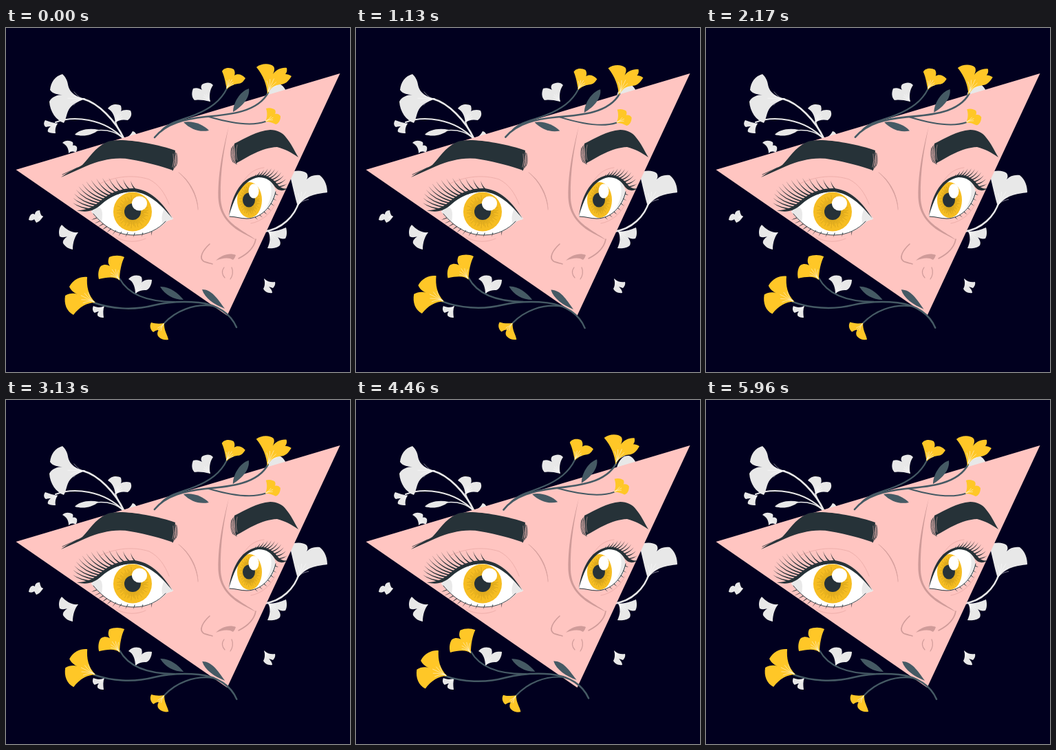
An HTML page with a canvas that plays this animation: 500x500 px, repeating every 6 s.

```html
<!DOCTYPE html>
<html lang="en">
<head>
<meta charset="utf-8">
<title>Eyes and ginkgo</title>
<style>
html, body { margin: 0; width: 100%; height: 100%; overflow: hidden; background: #01001f; }
canvas { display: block; width: 500px; height: 500px; }
</style>
</head>
<body>
<canvas id="stage"></canvas>
<script>
const SIZE = 500, LOOP = 6000;
const NAVY = '#01001f', SKIN = '#ffc5c1', INK = '#263238', STEM = '#455a64',
      YELLOW = '#ffc727', GREY = '#e8e8e8', LINE = '#cf9b99', FAINT = '#eeafab';

const canvas = document.getElementById('stage');
const ratio = window.devicePixelRatio || 1;
canvas.width = canvas.height = SIZE * ratio;
let ctx;

function fill(d, color) {
  ctx.fillStyle = color;
  ctx.fill(new Path2D(d));
}
function stroke(d, color, width) {
  ctx.strokeStyle = color;
  ctx.lineWidth = width;
  ctx.stroke(new Path2D(d));
}
function oval(x, y, rx, ry, color) {
  ctx.fillStyle = color;
  ctx.beginPath();
  ctx.ellipse(x, y, rx, ry, 0, 0, Math.PI * 2);
  ctx.fill();
}
// Fine white veins fanning out from the foot of a petal pair
function veins(x, y, angle, length) {
  const a0 = angle * Math.PI / 180, side = length > 12 ? 2 : 1;
  for (let i = -side; i <= side; i++) {
    const a = a0 + i * 0.28, r = length * (1 - Math.abs(i) * 0.12);
    stroke(`M${x} ${y}Q${x + Math.cos(a0) * r * 0.4} ${y + Math.sin(a0) * r * 0.4} ${x + Math.cos(a) * r} ${y + Math.sin(a) * r}`, '#fff', 0.5);
  }
}
function bloom(d, color, x, y, angle, length) {
  fill(d, color);
  veins(x, y, angle, length);
}
function cubic(p, t) {
  const u = 1 - t, w = [u * u * u, 3 * u * u * t, 3 * u * t * t, t * t * t];
  return [0, 1].map(k => w.reduce((sum, v, i) => sum + v * p[i][k], 0));
}
// Tapered lashes between a root curve and a tip curve
function lashes(roots, tips, count, width, bend) {
  ctx.fillStyle = INK;
  for (let i = 0; i < count; i++) {
    const t = i / (count - 1);
    const [x, y] = cubic(roots, t), [tx, ty] = cubic(tips, t);
    const cx = x + (tx - x) * 0.65, cy = y + (ty - y) * bend;
    const len = Math.hypot(tx - x, ty - y) || 1;
    const nx = -(ty - y) / len * width / 2, ny = (tx - x) / len * width / 2;
    ctx.beginPath();
    ctx.moveTo(x + nx, y + ny);
    ctx.quadraticCurveTo(cx + nx * 0.6, cy + ny * 0.6, tx, ty);
    ctx.quadraticCurveTo(cx - nx * 0.6, cy - ny * 0.6, x - nx, y - ny);
    ctx.fill();
  }
}
function iris(x, y, rx, ry) {
  oval(x, y, rx, ry, '#f6bd22');
  ctx.strokeStyle = 'rgba(150,112,20,0.55)';
  ctx.lineWidth = 0.5;
  ctx.beginPath();
  for (let i = 0; i < 72; i++) {
    const a = i * Math.PI / 36, r = 0.72 + 0.12 * Math.sin(i * 2.4);
    ctx.moveTo(x + Math.cos(a) * rx * 0.38, y + Math.sin(a) * ry * 0.38);
    ctx.lineTo(x + Math.cos(a) * rx * r, y + Math.sin(a) * ry * r);
  }
  ctx.stroke();
}

function greyFlowers() {
  stroke('M112 103C134 109 159 134 172 162', GREY, 2.6);
  stroke('M72 137C98 127 142 131 171 161', GREY, 2);
  stroke('M130 149C150 147 162 152 172 162', GREY, 1.6);
  stroke('M159 136C162 145 166 151 171 160', GREY, 1.8);
  fill('M100 155C106 148 120 145 135 148C124 157 111 158 100 155Z', GREY);
  fill('M170 160C174 160 180 158 184 150C188 151 190 154 190 158Z', GREY);
  bloom('M116 103C104 101 92 95 90 82C89 76 87 72 82 67C71 70 65 79 64 90C68 96 76 97 82 97C75 97 66 100 63 107C64 122 73 134 84 138C88 132 88 122 93 116C99 109 108 105 116 103Z', GREY, 114, 103, 182, 24);
  bloom('M159 138C158 128 155 121 148 117C153 110 162 110 167 113C168 117 168 119 167 121C170 119 176 118 181 120C184 126 181 131 177 134C171 133 164 133 159 138Z', GREY, 160, 136, -58, 13);
  bloom('M75 139C69 138 63 136 57 134C54 138 55 142 58 144C61 143 63 143 65 143C62 145 60 148 61 151C65 153 69 153 72 153C71 148 72 143 75 139Z', GREY, 74, 139, 150, 8);
  bloom('M91 182C91 175 88 170 82 167C86 163 92 163 97 166C98 168 97 170 97 171C99 170 102 171 103 173C104 177 102 180 101 181C97 179 94 179 91 182Z', GREY, 92, 181, -55, 8);
  bloom('M297 107C286 104 278 104 274 105C269 100 270 93 272 88C277 86 282 88 285 90C283 87 283 85 285 82C290 79 297 78 301 83C296 90 295 99 297 107Z', GREY, 296, 106, 230, 12);
  fill('M378 104C380 88 388 80 397 81C403 83 406 89 408 94Z', GREY);
  stroke('M426 252C420 273 401 293 374 296', GREY, 2.6);
  bloom('M424 259C421 250 417 232 412 211C420 206 432 207 437 211C439 214 439 217 437 220C442 215 448 213 456 214C464 220 467 230 467 239C452 241 435 243 424 259Z', GREY, 425, 257, -60, 22);
  bloom('M381 296C390 296 400 293 407 290C409 297 408 303 406 306C402 307 398 306 395 304C398 308 400 312 398 316C394 320 386 321 380 320C384 312 385 303 381 296Z', GREY, 382, 296, 45, 13);
  bloom('M375 364C380 369 386 370 391 369C392 373 390 376 388 378C386 377 384 377 382 376C384 378 387 381 387 385C381 386 376 383 374 379C376 376 377 370 375 364Z', GREY, 376, 366, 52, 8);
  bloom('M54 274C50 280 47 282 44 283C43 281 42 280 41 278C39 280 36 280 33 279C34 273 37 268 42 271C42 268 44 265 49 265C50 270 51 273 54 274Z', GREY, 53, 274, 165, 6);
  bloom('M105 297C95 298 88 293 81 286C77 290 76 297 78 303C82 305 86 304 89 303C85 306 82 309 83 313C87 319 92 321 97 322C97 312 100 303 105 297Z', GREY, 103, 298, 155, 12);
  bloom('M188 387C188 377 185 368 178 365C183 359 192 358 197 362C198 365 198 368 197 370C200 366 207 365 212 366C212 373 208 380 204 381C197 381 191 382 188 387Z', GREY, 189, 385, -58, 13);
  bloom('M143 404C137 407 131 406 127 404C125 408 126 412 129 414C131 413 133 412 135 412C133 414 132 417 134 419C137 421 140 421 142 421C141 414 141 409 143 404Z', GREY, 142, 405, 135, 8);
}

function faceLines() {
  stroke('M137 226C160 215 186 213 208 220C222 227 231 240 237 256', FAINT, 1);
  stroke('M160 304C174 312 190 312 203 306', FAINT, 1);
  fill('M251 210C268 222 279 243 279.5 265C277 243 266 223 251 210Z', LINE);
  stroke('M251 210C267 222 278 243 279 264', '#dda5a2', 0.8);
  fill('M324 142C317 171 308 205 308.5 247C310 270 321 283 337 294C347 300 356 304 363 308C356 302 347 298 338 291C323 281 313 269 312 247C311 205 318 171 324 142Z', LINE);
  stroke('M363 307C361 318 354 327 338 335', LINE, 1.6);
  stroke('M296 314C286 323 280 334 287 339C291 341 297 342 300 343', LINE, 1.6);
  fill('M305 338C313 330 325 326 334 330C333 333 332 335 330 337C324 333 315 334 305 338Z', LINE);
  stroke('M317 348C313 353 314 359 318 363', LINE, 1.2);
  stroke('M328 348C331 354 329 361 326 365', LINE, 1.2);
  stroke('M339 236C345 220 355 205 375 203', FAINT, 1);
  stroke('M356 284C373 281 386 268 391 256', FAINT, 1);
}

function brows() {
  fill('M80 217C90 209 103 204 111 199C121 189 129 174 146 166C157 161 180 163 203 167C220 170 235 174 246 178L243 207C226 201 204 195 181 191C160 187 137 192 116 201Z', INK);
  fill('M332 168C348 160 364 150 384 148C394 148 402 152 407 159C414 167 419 178 425 188C415 181 406 176 394 173C371 174 352 187 334 197Z', INK);
  for (let i = 0; i < 4; i++) {
    const x = 243 + i * 1.6;
    stroke(`M${x} ${179 + i}Q${x + 3} ${192 + i} ${x - 1} ${207 - i * 2}`, INK, 0.8);
    const r = 333 - i * 1.7;
    stroke(`M${r} ${168 + i * 2}Q${r - 3} ${183 + i} ${r + 2} ${198 - i}`, INK, 0.8);
  }
  stroke('M243 183Q245 193 242 202', SKIN, 0.5);
  stroke('M336 170Q333 182 336 192', SKIN, 0.5);
  stroke('M82 213L104 203', INK, 0.8);
}

function leftEye() {
  const white = 'M124 267C142 247 160 236 185 235C209 236 225 254 243 277C239 280 235 279 232 282C222 293 206 301 186 301C160 301 142 288 124 267Z';
  fill(white, '#fff');
  ctx.save();
  ctx.clip(new Path2D(white));
  fill('M120 266C139 254 143 262 138 288L120 280Z', '#e9e9e9');
  fill('M230 263C225 273 226 280 229 288L247 281Z', '#e9e9e9');
  iris(184, 267, 28, 28.5);
  oval(184, 267, 12, 12, INK);
  oval(194, 255, 11, 10.5, '#fff');
  ctx.restore();
  fill('M103 265C120 265 130 258 140 249C152 239 168 233 185 233C210 235 227 253 242 277C225 256 208 240 186 238C167 237 150 246 139 256C128 266 117 269 103 265Z', INK);
  stroke('M127 270C142 288 160 301 186 301C206 301 222 292 232 281', INK, 0.9);
  lashes([[126, 264], [140, 250], [158, 239], [190, 236]],
         [[97, 254], [95, 221], [132, 211], [181, 222]], 14, 2.2, 0.25);
  lashes([[132, 276], [146, 292], [166, 302], [212, 296]],
         [[124, 279], [137, 298], [163, 310], [211, 302]], 11, 1, 0.6);
}

function rightEye() {
  const white = 'M324 274C328 252 338 219 366 216C384 216 391 228 392 241C388 261 370 277 350 277C340 277 333 274 324 274Z';
  fill(white, '#fff');
  ctx.save();
  ctx.clip(new Path2D(white));
  fill('M379 216C388 228 388 244 378 262L398 250L393 222Z', '#e9e9e9');
  iris(354, 250, 18, 26);
  oval(353, 250, 9, 10.5, INK);
  oval(360, 237, 7.5, 10.5, '#fff');
  ctx.restore();
  fill('M324 274C327 250 338 218 366 214C383 212 392 224 397 230C401 233 405 234 409 233C403 238 396 237 391 231C385 222 379 217 367 217C342 221 330 252 324 274Z', INK);
  stroke('M325 274C334 274 340 277 350 277C369 277 387 261 392 238', INK, 1);
  lashes([[360, 217], [372, 212], [386, 217], [396, 231]],
         [[364, 212], [382, 198], [403, 202], [409, 226]], 11, 1.7, 0.3);
  lashes([[362, 275], [376, 270], [387, 255], [391, 241]],
         [[366, 279], [381, 274], [392, 260], [396, 243]], 7, 0.9, 0.6);
}

function topBranch() {
  stroke('M216 159C233 138 262 132 290 129C326 126 366 122 381 94', STEM, 2.6);
  stroke('M226 149C238 136 256 134 275 126C297 117 312 106 321 88', STEM, 2.2);
  stroke('M295 129C322 137 354 144 377 136', STEM, 2);
  fill('M330 122C330 109 340 92 353 88C355 100 345 113 330 122Z', STEM);
  fill('M258 137C270 134 287 140 295 149C281 152 268 147 258 137Z', STEM);
  bloom('M321 89C319 80 318 72 314 63C317 57 326 57 331 60C333 63 333 66 332 69C336 66 343 67 348 73C345 78 342 81 337 81C330 82 325 85 321 89Z', YELLOW, 321, 87, -58, 14);
  bloom('M380 96C379 82 374 69 364 57C371 51 384 51 389 56C391 59 390 63 388 67C392 61 400 57 408 58C409 62 408 65 406 67C409 67 412 68 415 70C411 77 406 82 399 82C390 83 384 88 380 96Z', YELLOW, 381, 92, -65, 20);
  bloom('M377 136C380 130 380 123 378 117C383 115 389 117 391 119C392 121 392 123 391 125C394 124 397 125 399 128C399 135 396 139 392 140C388 138 383 136 377 136Z', YELLOW, 378, 135, -25, 11);
}

function bottomBranch() {
  stroke('M335 435C327 416 308 402 280 399C258 397 236 398 215 403C184 411 152 408 127 399', STEM, 2.5);
  stroke('M165 364C178 388 208 398 245 398', STEM, 2.2);
  stroke('M230 429C246 412 272 400 302 404', STEM, 2.2);
  fill('M224 376C237 375 250 385 258 395C244 395 231 388 224 376Z', STEM);
  fill('M285 380C299 380 307 393 318 408C303 402 289 393 285 380Z', STEM);
  bloom('M165 367C159 361 148 362 135 365C133 357 135 349 138 346C143 343 147 344 151 346C148 342 148 338 150 333C157 330 166 330 172 333C168 341 165 354 165 367Z', YELLOW, 164, 365, 235, 17);
  bloom('M130 399C118 399 107 405 98 417C88 412 84 401 86 389C92 385 99 385 104 387C99 385 94 381 92 376C98 365 109 361 118 362C117 375 119 388 130 399Z', YELLOW, 128, 398, 206, 21);
  bloom('M230 429C224 430 217 430 211 428C208 433 210 439 214 442C217 440 219 439 222 439C220 441 219 446 222 449C226 453 231 454 236 453C235 446 229 439 230 429Z', YELLOW, 229, 430, 128, 12);
}

// Straight swing: 0 to 1 degree, to -1, back to 0
function sway(t) {
  const p = t / LOOP;
  if (p < 0.25) return p * 4;
  if (p < 0.75) return 2 - p * 4;
  return p * 4 - 4;
}

function layer(draw) {
  const c = document.createElement('canvas');
  c.width = c.height = SIZE * ratio;
  ctx = c.getContext('2d');
  ctx.scale(ratio, ratio);
  ctx.lineCap = 'round';
  draw();
  return c;
}

const still = layer(() => {
  ctx.fillStyle = NAVY;
  ctx.fillRect(0, 0, SIZE, SIZE);
  greyFlowers();
  fill('M14.5 206L485.5 66L321.5 418Z', SKIN);
  faceLines();
  leftEye();
  rightEye();
  brows();
});

const view = canvas.getContext('2d');
function frame(now) {
  ctx = view;
  ctx.setTransform(1, 0, 0, 1, 0, 0);
  ctx.drawImage(still, 0, 0);
  ctx.scale(ratio, ratio);
  ctx.lineCap = 'round';
  ctx.translate(250, 252.5);
  ctx.rotate(sway(now % LOOP) * Math.PI / 180);
  ctx.translate(-250, -252.5);
  topBranch();
  bottomBranch();
  requestAnimationFrame(frame);
}
frame(0);
</script>
</body>
</html>
```
